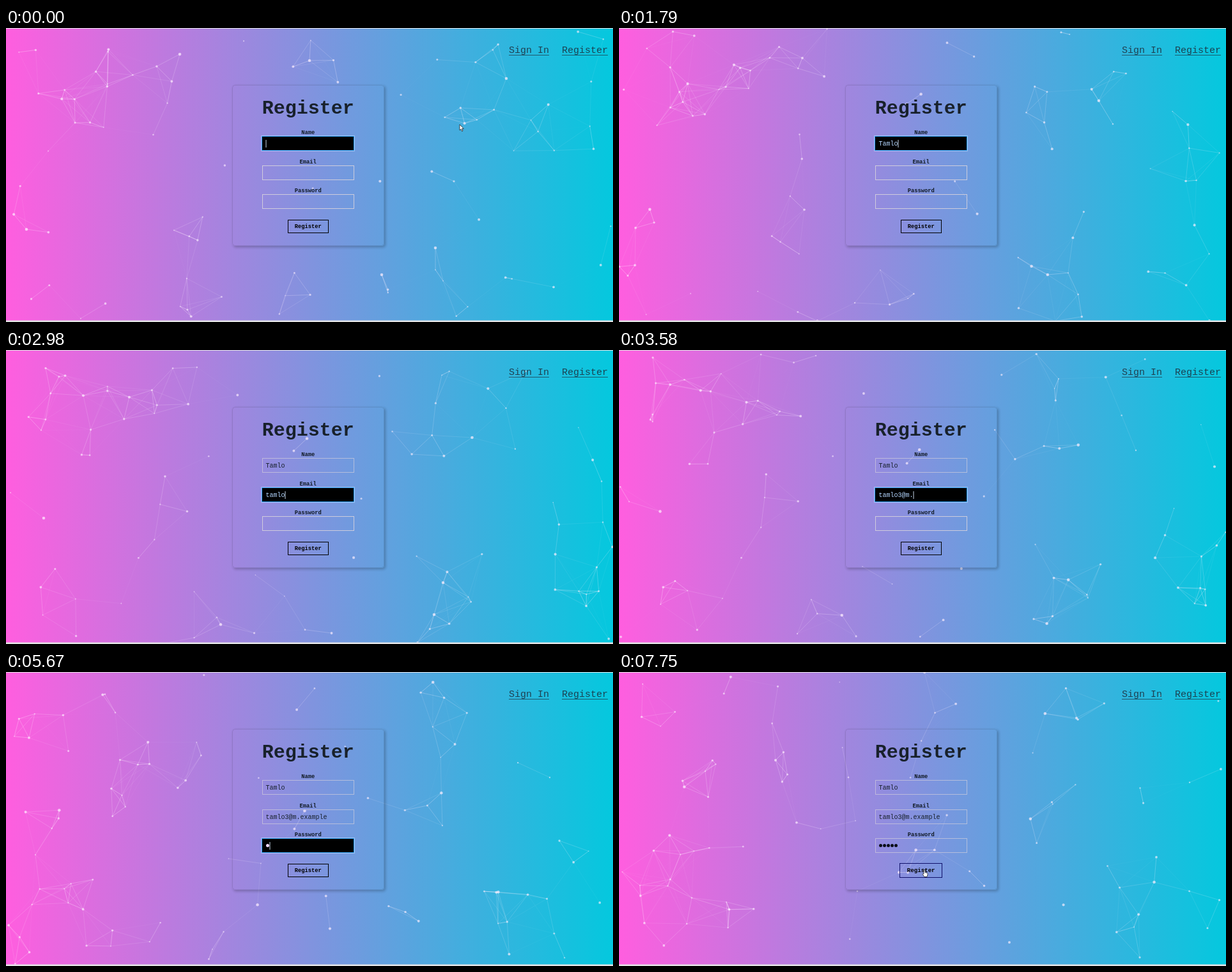
Animation of 950 by 460 pixels, one loop 8000 ms. Source, as an HTML page with a canvas:

```html
<!DOCTYPE html>
<html lang="en">
<head>
<meta charset="utf-8">
<title>Register</title>
<style>
  html, body { margin: 0; width: 100%; height: 100%; overflow: hidden; background: #e2e2e4; }
  #stage { position: relative; width: 950px; height: 460px; overflow: hidden; }
  canvas, svg { position: absolute; left: 0; top: 0; }
  text { font-family: "Courier New", "Liberation Mono", monospace; white-space: pre; }
  .bold { font-weight: bold; }
</style>
</head>
<body>
<div id="stage">
  <canvas id="net" width="950" height="460"></canvas>
  <svg id="ui" width="950" height="460" viewBox="0 0 950 460"></svg>
</div>
<script>
const W = 950, H = 461, LOOP = 8000, STEP = 298, LAST = 26;
const COUNT = 88, LINK = 84, CENTER = 472.7;
const ctx = document.getElementById('net').getContext('2d');
const ui = document.getElementById('ui');

let seed = 41;
const rand = (lo, hi) => {
  seed = (seed * 16807) % 2147483647;
  return lo + (hi - lo) * seed / 2147483647;
};
const wrap = (v, size) => ((v % size) + size) % size;

// Every dot drifts in a straight line (px per step) and wraps at the edges
const dot = (x, y, vx, vy, r = 2.3) => ({ x, y, vx, vy, r });
const randomDot = () => {
  const angle = rand(0, Math.PI * 2), speed = rand(5, 11);
  return dot(rand(0, W), rand(0, H), Math.cos(angle) * speed, Math.sin(angle) * speed, rand(.8, 2.1));
};
const dots = [
  dot(475, 51, -.4, 8.75),
  dot(783, 79, -5.35, 5.8),
  dot(672, 344, -.2, 7),
  dot(588, 386, 9.6, -2.2),
  dot(272, 41, 6.4, -7.25),
  dot(32, 315, 2.7, -5.2)
];
while (dots.length < COUNT) dots.push(randomDot());

const sky = ctx.createLinearGradient(0, 0, W, 0);
sky.addColorStop(0, '#ff5edf');
sky.addColorStop(1, '#04c8de');

function drawNet(k) {
  ctx.clearRect(0, 0, W, 460);
  ctx.save();
  ctx.beginPath();
  ctx.rect(0, 1, W, 456.5);
  ctx.clip();
  ctx.fillStyle = sky;
  ctx.fillRect(0, 0, W, 460);

  const pts = dots.map(d => ({ x: wrap(d.x + d.vx * k, W), y: wrap(d.y + d.vy * k, H), r: d.r }));
  ctx.lineWidth = .8;
  pts.forEach((p, i) => {
    for (const q of pts.slice(i + 1)) {
      const d = Math.hypot(p.x - q.x, p.y - q.y);
      if (d > LINK) continue;
      ctx.strokeStyle = `rgba(255,240,255,${.55 * (1 - d / LINK)})`;
      ctx.beginPath();
      ctx.moveTo(p.x, p.y);
      ctx.lineTo(q.x, q.y);
      ctx.stroke();
    }
  });
  for (const p of pts) {
    ctx.fillStyle = `rgba(255,240,255,${.4 + p.r * .13})`;
    ctx.beginPath();
    ctx.arc(p.x, p.y, p.r, 0, Math.PI * 2);
    ctx.fill();
  }
  ctx.restore();
}

// Each field takes focus at its step and fills at its own typing rate
const fields = [
  { title: 'Name', y: 169, value: 'Tamlo', from: 0, to: 7, rate: 1 },
  { title: 'Email', y: 215, value: 'tamlo3@m.example', from: 7, to: 18, rate: 1.7 },
  { title: 'Password', y: 260, value: '•••••', from: 18, to: LAST, rate: 1.3, masked: true }
];

const text = (str, x, y, size, attrs = '') =>
  `<text x="${x}" y="${y}" font-size="${size}" ${attrs}>${str}</text>`;
const box = (x, y, w, h, attrs) =>
  `<rect x="${x}" y="${y}" width="${w}" height="${h}" ${attrs}/>`;
const label = (str, y, size, fill = '#101a24') =>
  text(str, CENTER, y, size, `class="bold" text-anchor="middle" fill="${fill}"`);

function drawField({ title, y, value, from, to, rate, masked }, k) {
  const focused = k >= from && k < to;
  const typed = value.slice(0, Math.max(0, Math.round((k - from) * rate)));
  let out = label(title, y - 3.5, 8.75);
  if (focused) {
    out += box(399.5, y - .5, 146, 24, 'fill="none" stroke="#d5ecff" stroke-opacity=".45"')
      + box(400.5, y + .5, 144, 22, 'fill="#000" stroke="#2b9ef4"');
  } else {
    out += box(401.5, y + .5, 143, 22, `fill="none" stroke="#d6d2dc" stroke-opacity="${k < from ? .9 : .65}"`);
  }
  if (masked) {
    const ink = focused ? '#f3dcff' : '#0b0f18';
    out += [...typed].map((_, i) =>
      `<circle cx="${409.5 + i * 6}" cy="${y + 11.5}" r="2.5" fill="${ink}"/>`).join('');
  } else {
    out += text(typed, 406.5, y + 15, 10, `fill="${focused ? '#b4d6ff' : '#17202b'}"`);
  }
  if (focused) out += box(406.5 + typed.length * 6, y + 6, 1, 12, 'fill="#c4d4e6"');
  return out;
}

const link = (str, x) => `<g fill="#1d2c3a" opacity=".85">`
  + text(str, x, 39, 15) + box(x, 42, str.length * 9, 1, 'opacity=".8"') + '</g>';

function button(hover) {
  const pad = hover ? 1 : 0;
  return box(441.5 - 2 * pad, 300.5 - pad, 63 + 3 * pad, 20 + 2 * pad,
    `fill="none" stroke="${hover ? '#10106a' : '#000'}"`)
    + label('Register', 313 + pad * .3, 8.75 + pad * .4, '#000');
}

const cursor = (x, y, d) =>
  `<path transform="translate(${x} ${y})" d="${d}" fill="#fff" stroke="#222" stroke-width=".8"/>`;
const ARROW = 'M0 0V9L2 7.2 3.6 10.6 5 10 3.5 6.6H6.3Z';
const HAND = 'M2 1Q3-.5 4 1V4.5L7.5 5.5Q8.5 6 8 8L7 11.5H3L.2 7.5Q0 6 2 7Z';

// The pointer hides while typing, then glides to the button
function pointer(k) {
  if (k > 0 && k < 24) return '';
  const p = Math.max(0, (k - 23) / 3);
  return cursor(710 - 235 * p, 151 + 158 * p, k === LAST ? HAND : ARROW);
}

const card = `<defs>
  <filter id="blur" x="-10%" y="-10%" width="120%" height="120%"><feGaussianBlur stdDeviation="1.9"/></filter>
  <mask id="outside">${box(0, 0, W, 460, 'fill="#fff"')}${box(354, 89, 238, 252, 'rx="4" fill="#000"')}</mask></defs>
  <g mask="url(#outside)">${box(356, 91, 238, 252, 'rx="4" opacity=".24" filter="url(#blur)"')}</g>
  ${box(354.5, 89.5, 237, 251, 'rx="4" fill="none" stroke="#000" stroke-opacity=".1"')}`;

function drawUi(k) {
  ui.innerHTML = card + link('Sign In', 787) + link('Register', 870)
    + label('Register', 134, 30, '#18212b')
    + fields.map(f => drawField(f, k)).join('')
    + button(k === LAST) + pointer(k);
}

let shown = -1;
const start = performance.now();
function tick() {
  const t = (performance.now() - start) % LOOP;
  const k = Math.min(LAST, Math.floor((t + 2) / STEP));
  if (k !== shown) {
    shown = k;
    drawNet(k);
    drawUi(k);
  }
  requestAnimationFrame(tick);
}
tick();
</script>
</body>
</html>
```
